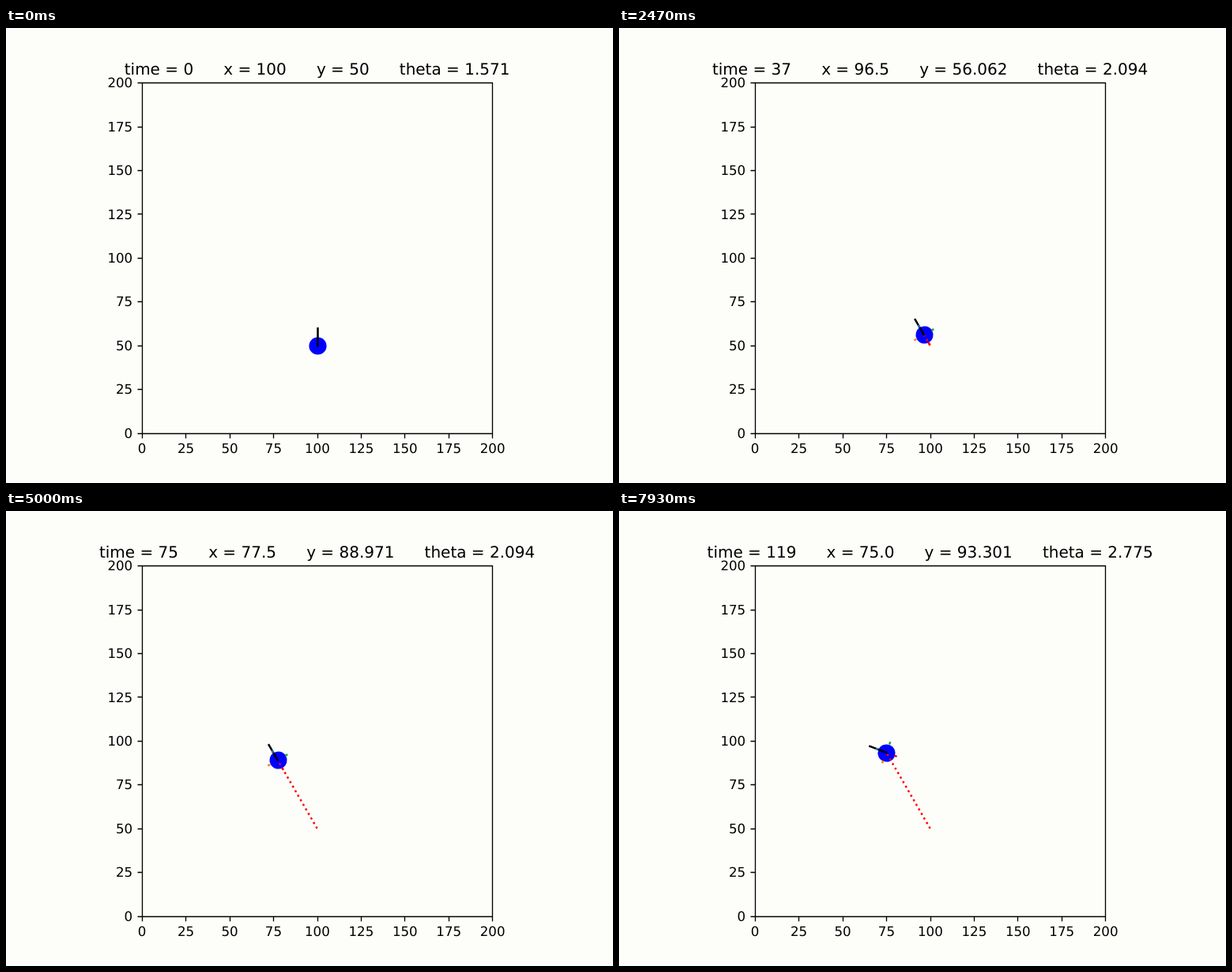
An HTML page for the animation above (8 s loop, 768 px wide and 576 px high).

```html
<!DOCTYPE html>
<html lang="en">
<head>
<meta charset="utf-8">
<title>Robot motion</title>
<style>
  html, body { margin: 0; width: 100%; height: 100%; overflow: hidden; background: #fdfefa; }
  svg { display: block; width: 768px; height: 576px; }
  text { font: 16.667px "DejaVu Sans", sans-serif; white-space: pre; text-rendering: geometricPrecision; }
  #title { font-size: 20px; text-anchor: middle; }
  .frame { fill: none; stroke: #000; stroke-width: 1.33; }
  .line { fill: none; stroke-width: 2.5; }
</style>
</head>
<body>
<svg id="stage" viewBox="0 0 768 576">
  <g id="axes"></g>
  <circle id="body" r="11.09" fill="#00f"/>
  <path id="trail" class="line" stroke="#f00" stroke-dasharray="2.5 4.125"/>
  <path id="heading" class="line" stroke="#000" stroke-linecap="square" d="M0 0H22.18"/>
  <g id="sensors"></g>
  <text id="title" x="393.6" y="59"></text>
</svg>
<script>
const LOOP = 8000, STEP = 200 / 3, STEPS = 120;
const TURN = 30, DRIVE = 50;              // steps spent turning, then driving
const LEFT = 171.84, BOTTOM = 512.64, UNIT = 2.2176;
const $ = id => document.getElementById(id);
const px = x => LEFT + x * UNIT;
const py = y => BOTTOM - y * UNIT;
const snap = v => Math.round(v) + 0.5;

function add(parent, tag, attrs, text = '') {
  const el = document.createElementNS('http://www.w3.org/2000/svg', tag);
  for (const key in attrs) el.setAttribute(key, attrs[key]);
  el.textContent = text;
  parent.append(el);
  return el;
}

function drawAxes() {
  const axes = $('axes');
  let d = 'M172.5 69.5H615.5V513.5H172.5Z';
  for (let v = 0; v <= 200; v += 25) {
    d += `M${snap(px(v))} 513.5v6M172.5 ${snap(py(v))}h-6`;
    add(axes, 'text', { x: px(v) + 0.3, y: 538, 'text-anchor': 'middle' }, v);
    add(axes, 'text', { x: 160.2, y: Math.round(py(v) + 6.1), 'text-anchor': 'end' }, v);
  }
  add(axes, 'path', { class: 'frame', d });
}

function drawSensors() {
  ['#1f77b4', '#ff7f0e', '#f00', '#2ca02c'].forEach((stroke, i) =>
    add($('sensors'), 'path', { class: 'line', stroke, d: 'M11 0H14.4', transform: `rotate(${-90 * i})` }));
}

// Up to three decimals, always showing at least one
function decimal(v) {
  const n = Number(v.toFixed(3));
  return Number.isInteger(n) ? n + '.0' : String(n);
}

function stepAt(time) {
  const start = n => Math.round(n * STEP / 10) * 10;
  let n = Math.floor(time / STEP);
  if (start(n) > time) n--;
  else if (start(n + 1) <= time) n++;
  return Math.min(n, STEPS - 1);
}

function render(n) {
  const driven = Math.min(Math.max(n - TURN, 0), DRIVE);
  const degrees = 90 + n - driven;
  const x = 100 - driven * 0.5;
  const y = 50 + driven * Math.sqrt(0.75);
  const theta = degrees * Math.PI / 180;
  const place = (cx, cy) => `translate(${cx} ${cy}) rotate(${-degrees})`;
  const cx = px(x), cy = py(y);
  const snapped = place(snap(cx), snap(cy));

  $('body').setAttribute('transform', snapped);
  $('sensors').setAttribute('transform', place(cx, cy));
  $('sensors').setAttribute('visibility', n ? 'visible' : 'hidden');
  $('heading').setAttribute('transform', n ? place(cx, cy) : snapped);
  $('trail').setAttribute('d', driven ? `M${px(100)} ${py(50)}L${cx} ${cy}` : '');

  const show = n ? decimal : String;
  $('title').textContent = [
    `time = ${n}`, `x = ${show(x)}`, `y = ${show(y)}`, `theta = ${decimal(theta)}`
  ].join(' '.repeat(6));
}

drawAxes();
drawSensors();
const begin = performance.now();
let shown = -1;
function tick() {
  const n = stepAt((performance.now() - begin) % LOOP);
  if (n !== shown) render(shown = n);
  requestAnimationFrame(tick);
}
tick();
</script>
</body>
</html>
```
